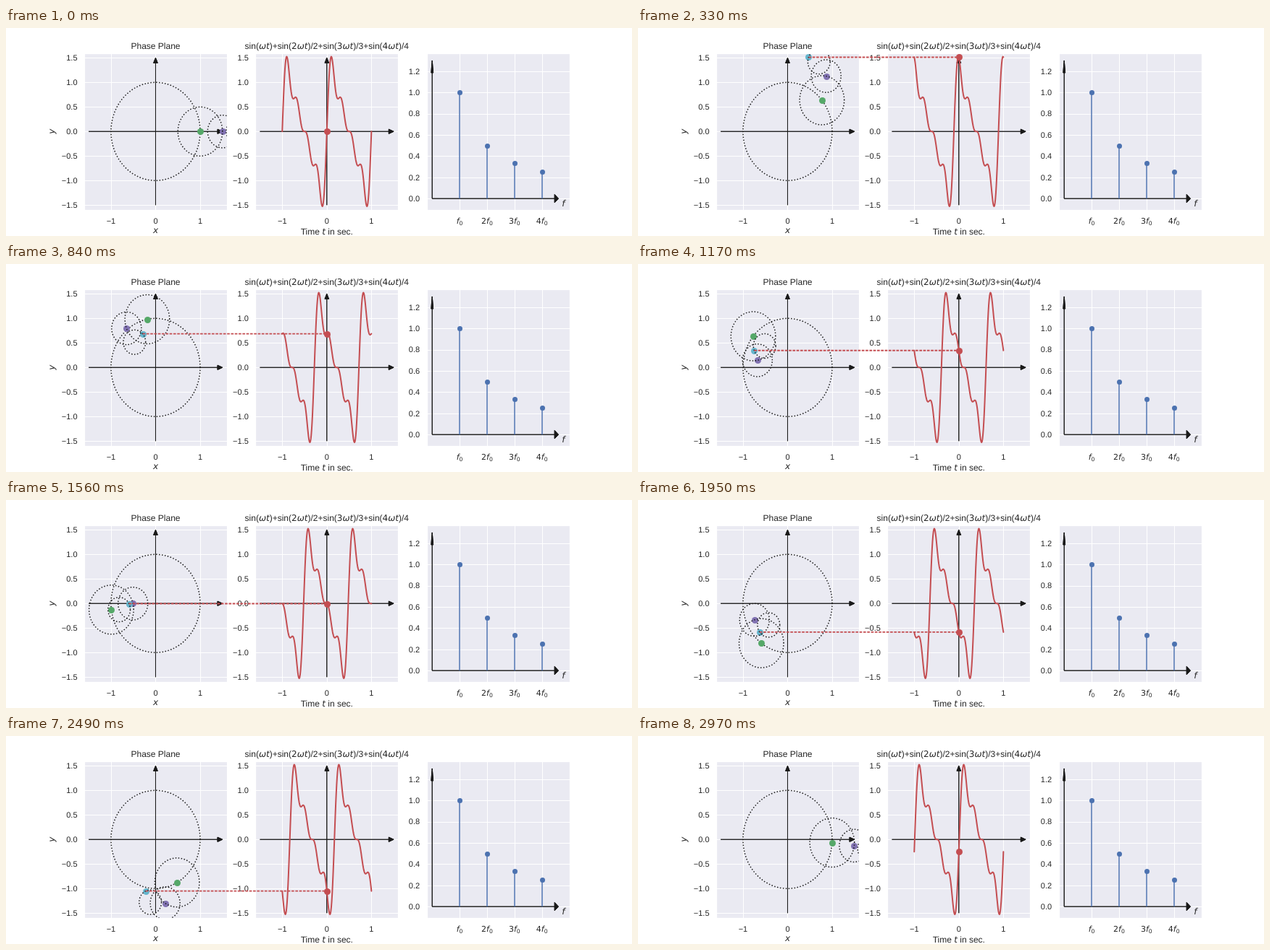
An HTML page for the animation above (3 s loop, 864 by 288 pixels).

```html
<!DOCTYPE html>
<html lang="en">
<head>
<meta charset="utf-8">
<title>Fourier epicycles</title>
<style>
  html, body { margin: 0; width: 100%; height: 100%; overflow: hidden; background: #fff; }
  svg { display: block; width: 864px; height: 288px; }
  text { font: 11px "Liberation Sans", Arial, sans-serif; fill: #262626; text-rendering: geometricPrecision; }
  .big { font-size: 12px; }
  .math { font-family: "DejaVu Sans", sans-serif; }
  .it { font-family: "DejaVu Sans", sans-serif; font-style: oblique; }
  .sub { font-size: 7.7px; }
</style>
</head>
<body>
<svg id="stage" viewBox="0 0 864 288" xmlns="http://www.w3.org/2000/svg"></svg>
<script>
const stage = document.getElementById('stage');
const TOP = 34.56, BOTTOM = 252, WIDTH = 196.94;
const LOOP = 3000, STEPS = 100, HARMONICS = [1, 2, 3, 4];
const GREEN = '#55a868', PURPLE = '#8172b2', CYAN = '#64b5cd', RED = '#c44e52', BLUE = '#4c72b0', INK = '#1a1a1a';

function add(parent, tag, attrs = {}, html = '') {
  const el = document.createElementNS('http://www.w3.org/2000/svg', tag);
  set(el, attrs);
  if (html) el.innerHTML = html;
  parent.appendChild(el);
  return el;
}
function set(el, attrs) {
  for (const name in attrs) el.setAttribute(name, attrs[name]);
}
const label = (x, y, html, anchor = 'middle', cls = '') =>
  add(stage, 'text', { x, y, 'text-anchor': anchor, class: cls }, html);
const dot = (parent, color, r = 4.5) => add(parent, 'circle', { r, fill: color });
const move = (el, x, y) => el.setAttribute('transform', `translate(${x} ${y})`);
const it = s => `<tspan class="it">${s}</tspan>`;
const math = s => `<tspan class="math">${s}</tspan>`;

// Grid lines, frames and dots sit on pixel centres.
const snap = v => Math.round(v) + 0.5;
const moveDot = (el, x, y) => move(el, snap(x), snap(y));

function makeAxes(left, x0, y0, ux, uy) {
  const X = v => x0 + v * ux, Y = v => y0 - v * uy;
  const x1 = Math.round(left), x2 = Math.round(left + WIDTH), y1 = 35, h = BOTTOM - y1;
  const box = { x: x1, y: y1, width: x2 - x1, height: h };
  const id = 'clip' + x1;
  add(add(stage, 'clipPath', { id }), 'rect', box);
  add(stage, 'rect', { ...box, fill: '#eaeaf2' });
  const grid = add(stage, 'path', { stroke: '#fff', fill: 'none' });
  const body = add(stage, 'g', { 'clip-path': `url(#${id})` });
  add(stage, 'rect', { ...box, x: x1 + 0.5, y: y1 + 0.5, fill: 'none', stroke: '#fff', 'stroke-width': 1.25 });

  // The outline runs along the shaft both ways, so it is stroked twice.
  function inkTwice(d) {
    for (let i = 0; i < 2; i++) add(body, 'path', { d, stroke: INK, fill: INK });
  }

  let d = '';
  return {
    X, Y, body,
    xTick(v, html, baseline = 270.5) {
      d += `M${snap(X(v))} ${y1}v${h}`;
      grid.setAttribute('d', d);
      label(X(v), baseline, html);
    },
    yTick(v) {
      d += `M${x1} ${snap(Y(v))}H${x2}`;
      grid.setAttribute('d', d);
      label(left - 9.5, Y(v) + 3.9, v.toFixed(1).replace('-', '−'), 'end');
    },
    arrows(from, toX, toY, [lx, wx], [ly, wy]) {
      inkTwice(`M${X(from)} ${Y(0)}H${X(toX) - lx}v${-wx}l${lx} ${wx}l${-lx} ${wx}v${-wx}`);
      inkTwice(`M${X(0)} ${Y(from)}V${Y(toY) + ly}h${-wy}l${wy} ${-ly}l${wy} ${ly}h${-wy}`);
    }
  };
}

function squareAxes(left) {
  const axes = makeAxes(left, left + WIDTH / 2, (TOP + BOTTOM) / 2, WIDTH / 3.2, (BOTTOM - TOP) / 3.2);
  [-1, 0, 1].forEach(v => axes.xTick(v, String(v).replace('-', '−')));
  for (let v = -1.5; v <= 1.5; v += 0.5) axes.yTick(v);
  axes.arrows(-1.5, 1.5, 1.5, [6.8, 3.1], [7, 2.8]);
  return axes;
}

const phase = squareAxes(108);
const wave = squareAxes(344.33);
const spectrum = makeAxes(580.66, 588.23, 236.2, WIDTH / 5.2, 147.1);

// Titles and axis names
label(206.5, 28.5, 'Phase Plane', 'middle', 'big');
label(442.8, 28.5, HARMONICS.map(k => k === 1
  ? `sin(${it('ωt')})`
  : `sin(${math(k)}${it('ωt')})/${k}`).join('+'), 'middle', 'big');
label(206.5, 284, it('x'), 'middle', 'big');
label(442.8, 286, `Time ${it('t')} in sec.`, 'middle', 'big');
label(769.4, 247, it('f'), 'middle', 'big');
label(0, 0, it('y'), 'middle', 'big').setAttribute('transform', 'translate(67.2 143.3) rotate(-90)');

// Spectrum
for (let i = 0; i <= 6; i++) spectrum.yTick(i / 5);
spectrum.arrows(0, 4.6, 1.3, [5.2, 5.6], [17, 1.4]);
for (const k of HARMONICS) {
  const x = spectrum.X(k), y = spectrum.Y(1 / k);
  spectrum.xTick(k, math(k > 1 ? k : '') + it('f') + '<tspan class="math sub" dy="1.6">0</tspan>', 271);
  add(spectrum.body, 'path', { d: `M${Math.round(x)} ${spectrum.Y(0)}V${y}`, stroke: BLUE, 'stroke-width': 1.5 });
  moveDot(dot(spectrum.body, BLUE, 3.5), x, y);
}

// Moving parts, in stacking order
function dottedCircle(k) {
  const rx = WIDTH / 3.2 / k, ry = (BOTTOM - TOP) / 3.2 / k;
  return add(phase.body, 'path', {
    d: `M${rx} 0A${rx} ${ry} 0 0 0 ${-rx} 0A${rx} ${ry} 0 0 0 ${rx} 0`,
    fill: 'none', stroke: INK, 'stroke-width': 1.5, 'stroke-dasharray': '1.5 2.475'
  });
}
const circles = [dottedCircle(1)];
const greenDot = dot(phase.body, GREEN);
const purpleDot = dot(phase.body, PURPLE);
const cyanDot = dot(phase.body, CYAN);
circles.push(dottedCircle(2), dottedCircle(3), dottedCircle(4));
const link = add(stage, 'path', { stroke: RED, 'stroke-width': 1.8, 'stroke-dasharray': '3.7 1.6' });
const curve = add(stage, 'path', { fill: 'none', stroke: RED, 'stroke-width': 2, 'stroke-linejoin': 'round', 'stroke-linecap': 'round' });
const redDot = dot(stage, RED);

const signal = t => HARMONICS.reduce((sum, k) => sum + Math.sin(2 * Math.PI * k * t) / k, 0);

function draw(ms) {
  const turn = Math.floor((ms % LOOP) / LOOP * STEPS + 1e-6) / STEPS;
  const points = [[0, 0]];
  HARMONICS.forEach((k, i) => {
    const [x, y] = points[i], angle = 2 * Math.PI * k * turn;
    move(circles[i], phase.X(x), phase.Y(y));
    points.push([x + Math.cos(angle) / k, y + Math.sin(angle) / k]);
  });
  const place = (el, [x, y]) => moveDot(el, phase.X(x), phase.Y(y));
  place(greenDot, points[1]);
  place(purpleDot, points[2]);
  place(cyanDot, points[4]);

  const [tipX, tipY] = points[4];
  const y = wave.Y(tipY);
  set(link, {
    d: `M${phase.X(tipX)} ${y}H${wave.X(0)}`,
    visibility: tipX <= 1.6 ? 'visible' : 'hidden'
  });
  moveDot(redDot, wave.X(0), y);

  let d = '';
  for (let i = 0; i <= 200; i++) {
    const t = i / 100 - 1;
    d += `${i ? 'L' : 'M'}${wave.X(t).toFixed(2)} ${wave.Y(signal(t + turn)).toFixed(2)}`;
  }
  curve.setAttribute('d', d);
}

function tick() {
  draw(performance.now());
  requestAnimationFrame(tick);
}
tick();
</script>
</body>
</html>
```
